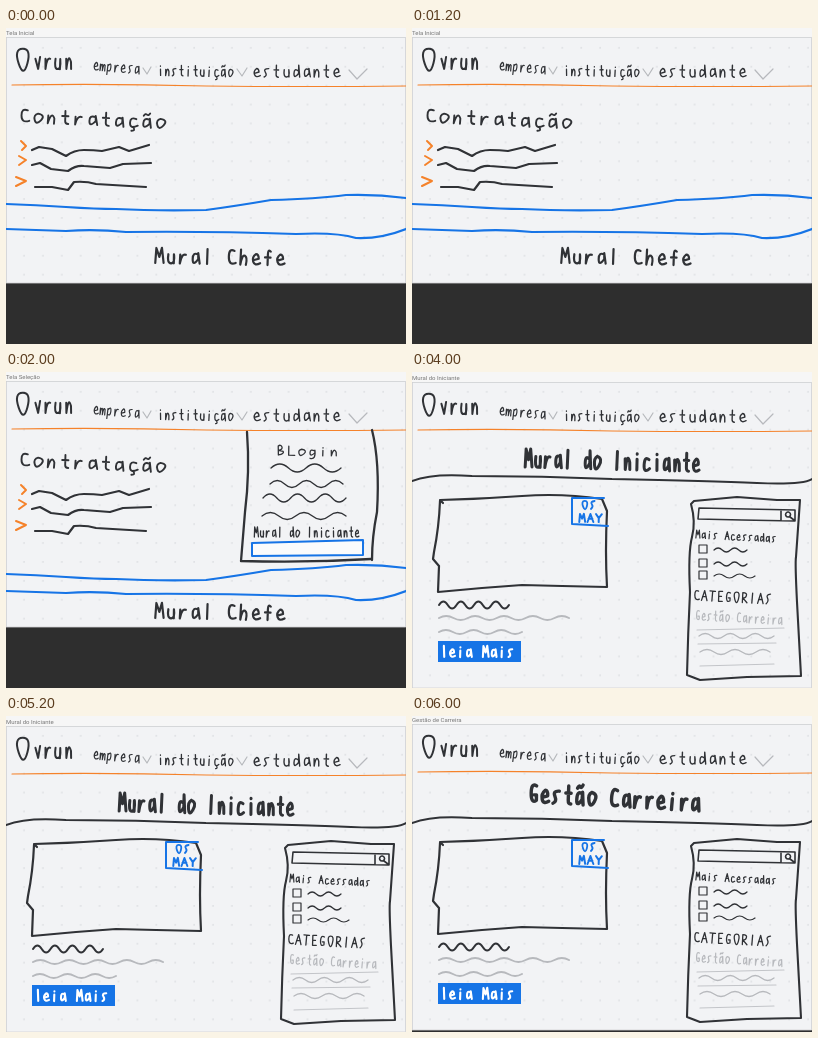
Write an HTML page that moves like this. It is 400 px wide and 316 px high and loops after 8 s.

```html
<!DOCTYPE html>
<html lang="pt">
<head>
<meta charset="utf-8">
<style>
  html, body { margin: 0; width: 100%; height: 100%; overflow: hidden; }
  svg { display: block; width: 100%; height: 100%; }
  path { fill: none; stroke-linecap: round; stroke-linejoin: round; vector-effect: non-scaling-stroke; }
  text { font: 6px Roboto, sans-serif; fill: #777; }
</style>
</head>
<body>
<svg id="stage" viewBox="0 0 400 316"></svg>
<script>
const INK = '#303236', BLUE = '#1674e6', ORANGE = '#f5822a', GRAY = '#b7b9bd', DARK = '#2e2e2e';

// Pen strokes of each letter in a cell 6 wide and 10 tall
const lower = {
  a: 'M5 4Q1 2 1 7T5 7V3L6 10',
  c: 'M5 4Q1 2 1 7T6 9',
  d: 'M5 5Q1 2 1 7T5 7V0L6 10',
  e: 'M1 7L5 6Q5 3 3 3Q0 5 1 8T6 9',
  f: 'M5 1Q3-1 3 3V10M1 5H5',
  g: 'M5 5Q1 2 1 7T5 7V4Q6 15 1 13',
  h: 'M1 0V10Q2 3 4 4T5 10',
  i: 'M3 4V10M3 1V1.3',
  l: 'M3 0V10',
  m: 'M0 4V10Q1 2 3 5V10Q4 2 6 5V10',
  n: 'M1 4V10Q3 0 5 6V10',
  o: 'M3 3Q0 4 1 8T5 8T3 3',
  p: 'M1 4V13M1 5Q5 1 5 6T1 9',
  r: 'M1 4V10Q2 3 5 4',
  s: 'M5 3Q0 3 2 6T1 10',
  t: 'M3 0V8Q3 10 5 10M1 4H5',
  u: 'M1 4Q0 10 3 10T5 4V10',
  v: 'M1 4L3 10L5 3'
};
const upper = {
  A: 'M0 10L3 0L6 10M1 6H5',
  B: 'M1 0V10Q6 9 5 6L1 5Q5 4 4 1T1 0',
  C: 'M5 1Q1-1 1 5T6 9',
  E: 'M5 0H1V10H5M1 5H4',
  G: 'M5 1Q1-1 1 5T5 9V6H3',
  I: 'M3 0V10',
  L: 'M1 0V10H6',
  M: 'M0 10L1 0L3 6L5 0L6 10',
  O: 'M3 0Q-1 0 1 7T5 7T3 0',
  R: 'M1 10V0Q6 0 5 3T1 5L6 10',
  S: 'M5 0Q0 1 2 4T1 10',
  T: 'M0 0H6M3 0V10',
  Y: 'M0 0L3 5L6 0M3 5V10'
};
const glyphs = {
  ...lower, ...upper, ' ': '',
  'ã': lower.a + 'M1 1Q2-1 3 0T5-1',
  'ç': lower.c + 'M3 10Q5 13 2 13'
};

const pen = (d, color = INK, w = 2, extra = '') =>
  `<path d="${d}" stroke="${color}" stroke-width="${w}" ${extra}/>`;
const group = (inner, transform) => `<g transform="${transform}">${inner}</g>`;
const rect = (x, y, w, h, fill, more = '') =>
  `<rect x="${x}" y="${y}" width="${w}" height="${h}" fill="${fill}" ${more}/>`;

// Handwriting: top left corner, advance per letter, capital height, line weight, slope in degrees
const write = (str, x, y, step, h, w, tilt = 0, color = INK) => group([...str].map((ch, i) =>
  pen(glyphs[ch], color, w, `transform="translate(${i * step} 0) rotate(${i * 7 % 5 - 2}) scale(${step * .115} ${h / 10})"`)
).join(''), `translate(${x} ${y}) rotate(${tilt})`);

const wave = (x, y, width, bumps, amp, color, w) => {
  const s = width / bumps;
  return pen(`M${x} ${y}q${s / 2} ${-amp} ${s} 0` + `t${s} 0`.repeat(bumps - 1), color, w);
};

const board = (label, top, bottom) =>
  rect(0, 0, 400, 316, '#f6f6f6') + rect(0, bottom, 400, 316 - bottom, DARK) +
  rect(0.5, top + .5, 399, bottom - top - .5, '#f2f3f5') +
  rect(0.5, top + .5, 399, bottom - top - .5, 'url(#dots)', 'stroke="#cfd0d3" stroke-width=".8"') +
  `<text x="0" y="${top - 2.2}">${label}</text>`;

const header =
  write('O', 10, 21, 19, 21, 2) + write('vrun', 28, 24, 10.3, 17, 2) +
  write('empresa', 88, 31, 6.9, 11, 1.2, 5) + write('instituição', 152, 37, 7, 10.5, 1.3, 1) +
  write('estudante', 247, 37, 10, 12, 1.4) +
  pen('M137 40L141 46L145 39M231 41L236 48L241 40M343 42L351 51L361 41', GRAY, 1.2) +
  pen('M6 57Q100 55.5 200 58Q300 59 400 58', ORANGE, 1.2);

const hiring = header + write('Contratação', 14, 81, 13.6, 13, 1.9, 2.5) +
  pen('M15 113L20 118L16 122M13 128L20 132L13 137M10 149L20 153L10 158', ORANGE) +
  pen('M26 122L33 119L46 121L60 128Q68 122 78 122T96 123L113 119L123 123L143 117', INK, 2.2) +
  pen('M26 137L34 135L45 141L62 143Q70 137 78 138L104 140L117 136L145 135', INK, 2.2) +
  pen('M29 159H46L62 162L68 154Q80 153 90 156L140 159', INK, 2.2);

const footer = (dy1, dy2, dyText) =>
  group(pen('M0 176Q30 177 60 179T110 181Q150 183 200 182Q230 178 265 172Q310 171 340 167Q370 166 400 170', BLUE, 2.2), `translate(0 ${dy1})`) +
  group(pen('M0 201L60 203Q90 201 120 204Q200 203 290 206Q330 204 350 210Q375 211 400 201', BLUE, 2.2), `translate(0 ${dy2})`) +
  write('Mural Chefe', 149, 220 + dyText, 12.1, 15, 2.2, 1);

const menu =
  pen('M241 60Q244 100 239 140L235 189Q300 191 365 187', INK, 2.3) +
  pen('M366 58Q374 90 371 140Q366 165 366 188', INK, 2.3) +
  write('BLogin', 271, 74, 10.6, 9, 1.3, 1) +
  wave(265, 96, 70, 4, 8, INK, 1.3) + wave(264, 112, 73, 5, 7, INK, 1.3) +
  wave(257, 126, 83, 6, 8, INK, 1.3) + wave(256, 144, 84, 5, 7, INK, 1.3) +
  write('Mural do Iniciante', 248, 155, 5.95, 10, 1.3) +
  pen('M246 171L357 168V183L246 184Z', BLUE, 2, 'style="fill:#fafbfc"');

const card =
  pen('M31 131L28 128Q70 127 110 124T190 127L195 139Q193 180 195 215L150 214L110 213L70 216L26 220L27 194L21 187L22 180Q27 155 28 129', INK, 2.2) +
  pen('M192 126H160V152L196 154', BLUE) +
  write('OS', 170, 129, 8, 8, 1.8, 0, BLUE) + write('MAY', 167, 142, 8.5, 8, 2, 0, BLUE) +
  wave(27, 233, 70, 8, 7, INK, 2) + wave(27, 246, 130, 9, 4, GRAY, 2) + wave(27, 260, 83, 6, 4, GRAY, 2) +
  rect(26, 269, 83, 21, BLUE) + write('leia Mais', 29, 274, 8.3, 11, 2.1, 0, '#fff');

const sidebar =
  pen('M282 129L279 132Q284 150 280 165T278 220Q276 260 275 303L288 308L335 305L389 304Q387 270 385 230T384 185L388 128L365 128L325 125L282 129', INK, 2.1) +
  pen('M287 136L383 138V149L330 148L286 147ZM369 138V148M376 140a2.5 2.5 0 1 0 .1 0M378 145L382 148', INK, 1.6) +
  write('Mais Acessadas', 284, 158, 5.85, 8, 1.2, 3) +
  [173, 187, 199].map((y, i) =>
    pen(`M287 ${y}H295V${y + 8}H287Z`, INK, 1.2) + wave(302, y + 5, i < 2 ? 33 : 41, 4, 4, INK, 1.2)).join('') +
  write('CATEGORIAS', 282, 218, 8, 10, 1.3, 3) +
  write('Gestão Carreira', 284, 238, 5.9, 10, 1.2, 3, GRAY) +
  pen('M285 258L372 256M286 272L364 271M288 294L362 292', '#c3c5c9', 1.2) +
  wave(287, 264, 75, 6, 5, GRAY, 1.3) + wave(288, 280, 70, 5, 5, GRAY, 1.3);

const article = group(header, 'translate(0 1)') +
  pen('M0 109Q20 101 60 104Q130 104 200 107Q300 109 345 111T400 107') + card + sidebar;

const pages = [
  board('Tela Inicial', 9, 255) + hiring + footer(0, 0, 0),
  board('Tela Seleção', 9, 255) + hiring + footer(26, 18, 11) + menu,
  board('Mural do Iniciante', 10, 316) + article +
    write('Mural do Iniciante', 113, 77, 9.9, 18, 3, 1.5),
  board('Gestão de Carreira', 8, 314) + group(article, 'translate(0 -2)') +
    write('Gestão Carreira', 118, 68, 11.6, 18, 3.4, 3)
];

stage.innerHTML =
  `<defs><pattern id="dots" width="18.9" height="18.9" patternUnits="userSpaceOnUse">
    <circle cx="18" cy="0.9" r=".7" fill="#cbcdd1"/></pattern></defs>` +
  pages.map(p => `<g class="page">${p}</g>`).join('');

const layers = [...document.querySelectorAll('.page')];
function draw(now) {
  const current = Math.floor(now % 8000 / 2000);
  layers.forEach((g, i) => g.style.display = i === current ? '' : 'none');
  requestAnimationFrame(draw);
}
draw(performance.now());
</script>
</body>
</html>
```
